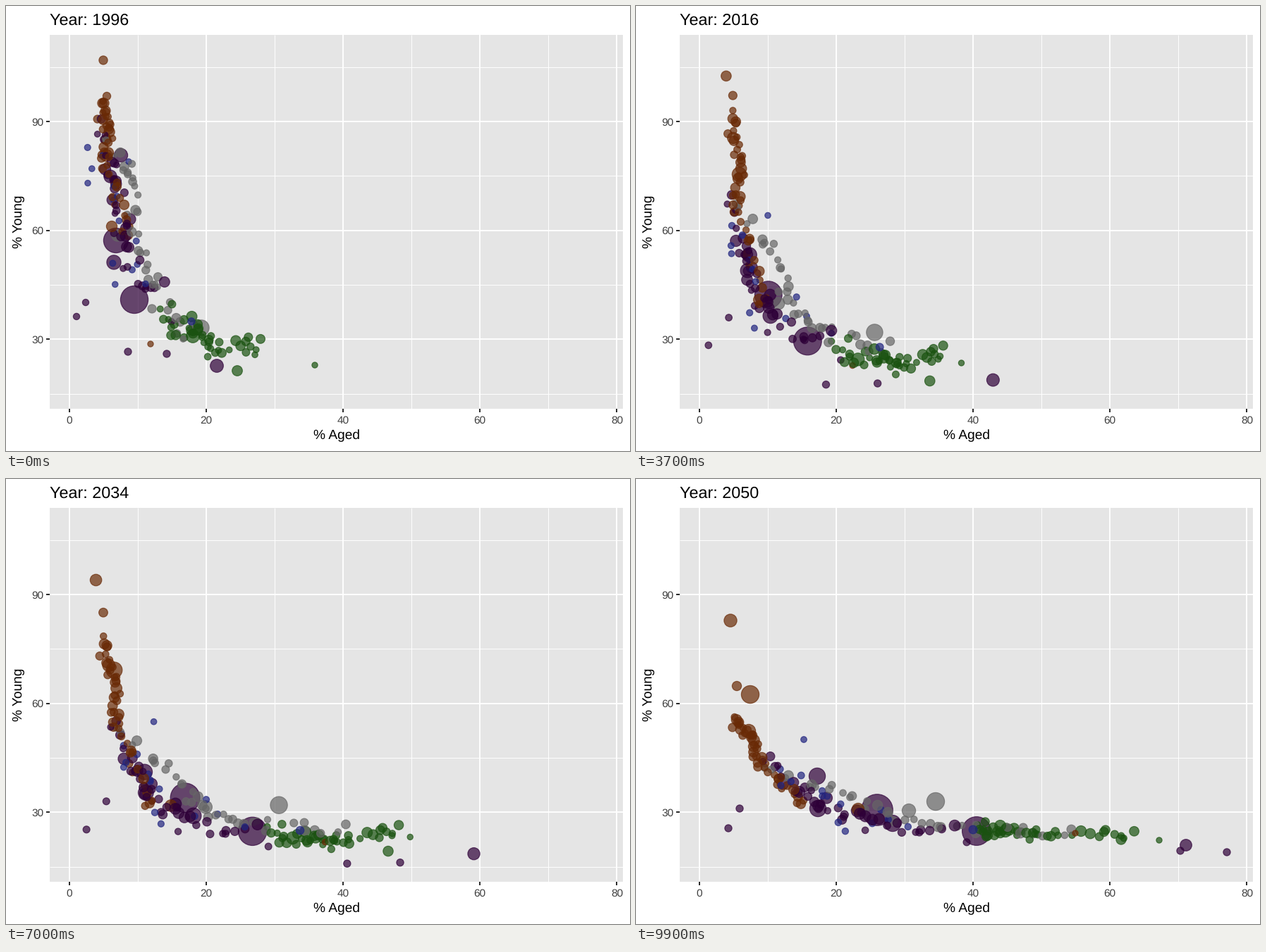
A matplotlib script that plays this animation: 885x632 px, repeating every 10000 ms.

```python
import numpy as np
import matplotlib.pyplot as plt
from matplotlib.animation import FuncAnimation
from matplotlib.patches import Rectangle

W, H, DPI = 885, 632, 100
FRAMES, STEP = 100, 100
FIRST, MIDDLE, LAST = 1996, 2021, 2050
LEFT, TOP, RIGHT, BOTTOM = 62, 41, 875, 572

BROWN, PURPLE, GREEN = "#692A06", "#2E0038", "#1A5210"
BLUE, GREY = "#20247F", "#666666"

plt.rcParams["font.family"] = "Liberation Sans"
plt.rcParams["text.hinting"] = "none"
rng = np.random.default_rng(12)
bubbles = []  # (colour, first radius, last radius, poses in the three key years)


def bubble(color, r0, r1, *poses):
    bubbles.append((color, r0, r1, np.array(poses, float)))


def crowd(color, n, small, large, spread_x, spread_y, *curves):
    """Scatter n bubbles along one curve per key year; each keeps its rank."""
    rank = (np.arange(n) + rng.random(n)) / n
    dx, dy = rng.normal(0, 0.6, (2, n)).clip(-1.2, 1.2)
    radius = small + (large - small) * rng.random(n) ** 1.5
    settle = np.linspace(1, 0.45, 3)  # the cloud thins out with time
    poses = []
    for curve, s in zip(curves, settle):
        xs, ys = np.transpose(curve)
        knots = np.linspace(0, 1, len(xs))
        poses.append(np.column_stack([np.interp(rank, knots, xs) + dx * spread_x,
                                      np.interp(rank, knots, ys) + dy * spread_y * s]))
    for i in range(n):
        bubble(color, radius[i], radius[i] + 0.4, *(p[i] for p in poses))


# The bubbles that stand out by size or by place
bubble(PURPLE, 20, 20.8, (182, 417), (267, 485), (483, 500))
bubble(PURPLE, 18, 22.7, (156, 333), (202, 424), (342, 470))
bubble(PURPLE, 10.5, 12, (153, 364), (207, 453), (364, 489))
bubble(PURPLE, 10, 12, (163, 212), (167, 376), (257, 422))
bubble(PURPLE, 9.5, 12, (148, 242), (166, 399), (258, 468))
bubble(PURPLE, 9.7, 8.7, (299, 511), (551, 533), (780, 520))
bubble(PURPLE, 5.5, 5.5, (228, 494), (390, 541), (838, 530))
bubble(PURPLE, 5.5, 5.5, (173, 491), (315, 543), (772, 528))
bubble(PURPLE, 5, 5.5, (100, 441), (105, 488), (131, 496))
bubble(PURPLE, 5, 5.5, (113, 421), (135, 447), (147, 468))
bubble(GREY, 11.5, 13, (277, 457), (352, 464), (425, 458))
bubble(GREY, 8.5, 10, (158, 326), (220, 438), (387, 471))
bubble(GREEN, 9.7, 9, (265, 469), (335, 506), (524, 500))
bubble(GREEN, 7.7, 7.5, (328, 518), (446, 533), (688, 512))
bubble(GREEN, 4.5, 4.5, (438, 510), (483, 507), (742, 513))
bubble(BROWN, 9, 13, (142, 212), (148, 247), (162, 306))
bubble(BROWN, 6.5, 9.5, (138, 77), (127, 109), (134, 201))
bubble(BROWN, 6, 7, (143, 128), (137, 138), (143, 294))
bubble(BROWN, 7.5, 10, (139, 138), (139, 205), (160, 358))
bubble(BROWN, 8, 9, (150, 313), (187, 434), (315, 469))
bubble(BROWN, 4.5, 4.5, (205, 480), (341, 514), (623, 503))
bubble(BLUE, 5.5, 6.3, (263, 448), (365, 490), (478, 498))
bubble(BLUE, 4.5, 4.7, (174, 221), (192, 312), (238, 370))

# Everyone else, by continent
crowd(BROWN, 43, 4.8, 8, 8, 12,
      [(138, 140), (141, 180), (145, 225), (175, 330)],
      [(138, 165), (145, 245), (150, 310), (190, 450)],
      [(140, 340), (160, 370), (185, 410), (240, 465)])
crowd(PURPLE, 40, 4.6, 8.5, 12, 24,
      [(135, 180), (155, 250), (165, 340), (225, 420)],
      [(138, 300), (165, 390), (195, 455), (300, 490)],
      [(185, 400), (250, 455), (320, 485), (460, 503)])
crowd(GREY, 36, 4.6, 7.2, 14, 20,
      [(155, 178), (178, 270), (205, 390), (255, 470)],
      [(155, 290), (215, 410), (270, 470), (385, 490)],
      [(190, 405), (310, 460), (430, 495), (620, 503)])
crowd(GREEN, 41, 4.6, 8, 8, 20,
      [(219, 440), (265, 460), (297, 490), (360, 490)],
      [(298, 490), (365, 508), (405, 515), (462, 497)],
      [(485, 496), (515, 500), (580, 506), (706, 508)])
crowd(BLUE, 14, 4.5, 4.9, 12, 40,
      [(120, 200), (145, 280), (160, 350), (200, 400)],
      [(150, 330), (160, 400), (180, 435), (300, 480)],
      [(205, 410), (250, 455), (300, 480), (390, 496)])

# Widest at the back, the small ones in mixed order
order = rng.permutation(len(bubbles))
bubbles = sorted((bubbles[i] for i in order), key=lambda b: -max(b[1], 8))
colors, r_first, r_last, poses = zip(*bubbles)
r_first, r_last, poses = np.array(r_first), np.array(r_last), np.array(poses)

fig = plt.figure(figsize=(W / DPI, H / DPI), dpi=DPI, facecolor="white")
ax = fig.add_axes([0, 0, 1, 1])
ax.set_xlim(0, W)
ax.set_ylim(H, 0)
ax.axis("off")


def px(n):
    return n * 72 / DPI


def line(xs, ys, width, color="white"):
    ax.plot(xs, ys, color=color, lw=px(width), solid_capstyle="butt", zorder=1)


def label(x, y, text, size, color="black", **kw):
    return ax.text(x, y, text, fontsize=px(size), color=color, va="baseline", **kw)


def x_at(v):
    return 89.5 + 9.712 * v


def y_at(v):
    return 628.2 - 5.158 * v


ax.add_patch(Rectangle((LEFT, TOP), RIGHT - LEFT, BOTTOM - TOP, fc="#E5E5E5", lw=0, zorder=0))
for v in range(10, 80, 20):
    line([x_at(v)] * 2, [TOP, BOTTOM], 0.95)
for v in range(15, 120, 30):
    line([LEFT, RIGHT], [y_at(v)] * 2, 0.95)
for v in range(0, 100, 20):
    line([x_at(v)] * 2, [TOP, BOTTOM], 1.9)
    line([x_at(v)] * 2, [BOTTOM, BOTTOM + 5], 1.9, "#222222")
    label(x_at(v), 592.5, str(v), 15.4, "#404040", ha="center")
for v in range(30, 120, 30):
    line([LEFT, RIGHT], [y_at(v)] * 2, 1.9)
    line([LEFT - 5, LEFT], [y_at(v)] * 2, 1.9, "#222222")
    label(53.5, y_at(v) + 5.5, str(v), 15.4, "#404040", ha="right")
label(468.5, 615, "% Aged", 19.2, ha="center")
label(23.5, 306.5, "% Young", 19.2, ha="center", rotation=90, rotation_mode="anchor")
title = label(62, 26.5, "", 23.4, ha="left")

dots = ax.scatter(*poses[:, 0].T, c=colors, alpha=0.7, linewidths=px(1.2), zorder=2)
dots.set_edgecolor(dots.get_facecolor())


def glide(s):
    """Quadratic path through the three poses."""
    m = (MIDDLE - FIRST) / (LAST - FIRST)
    a = (s - m) * (s - 1) / m
    b = s * (s - 1) / (m * (m - 1))
    c = s * (s - m) / (1 - m)
    return a * poses[:, 0] + b * poses[:, 1] + c * poses[:, 2]


def update(i):
    s = i / (FRAMES - 1)
    dots.set_offsets(glide(s))
    radius = r_first + (r_last - r_first) * s
    dots.set_sizes(px(2 * radius - 0.8) ** 2)
    title.set_text(f"Year: {round(FIRST + (LAST - FIRST) * s)}")
    return dots, title


anim = FuncAnimation(fig, update, frames=FRAMES, interval=STEP, repeat=True, repeat_delay=0)
plt.show()
```
